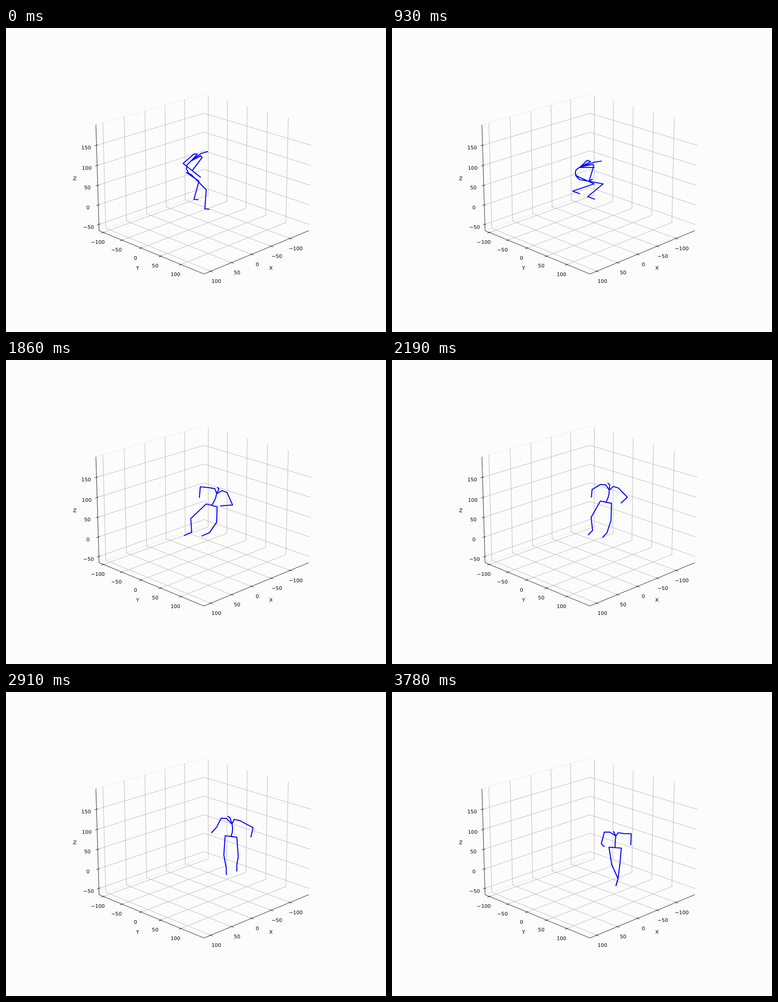
Animation of 837 by 669 pixels, one loop 3810 ms. Source, as an HTML page:

```html
<!DOCTYPE html>
<html lang="en">
<head>
<meta charset="utf-8">
<title>3D skeleton plot</title>
<style>
  html, body { margin: 0; width: 100%; height: 100%; overflow: hidden; background: #fcfcfc; }
  svg { display: block; }
  path { fill: none; stroke-width: 0.9; }
  #grid { stroke: #b0b0b0; }
  #pane { stroke: #e6e6e6; }
  #axes { stroke: #000; }
  #body { stroke: #00f; stroke-width: 2.2; stroke-linejoin: round; stroke-linecap: square; }
  text { font: 11.11px "DejaVu Sans", sans-serif; text-anchor: middle; fill: #000; }
</style>
</head>
<body>
<svg width="837" height="669" viewBox="0 0 837 669">
  <path id="pane"/>
  <path id="grid"/>
  <path id="axes"/>
  <g id="labels"></g>
  <path id="body"/>
</svg>
<script>
const LOOP = 3810, STEP = 30;
const $ = id => document.getElementById(id);
const line = (...points) => 'M' + points.map(p => p.map(n => n.toFixed(2))).join('L');
const add = (a, b, k = 1) => [a[0] + k * b[0], a[1] + k * b[1]];
const sub = (a, b) => add(a, b, -1);

// Perspective view of the unit box; (0, 0, 0) is the far floor corner
function project(x, y, z) {
  const depth = 1 - 0.07 * (x + y) - 0.0274 * z;
  return [436 + 214.8 * (y - x) / depth, (364 + 50.8 * (x + y) - 222.6 * z) / depth];
}
const edge = (...corners) => line(...corners.map(c => project(...c)));

function drawPlot() {
  const out = 1.017, inn = 0.989;
  let grid = '', labels = '';
  let axes = edge([1, 0, 1], [1, 0, 0], [1, 1, 0], [0, 1, 0]);
  const label = ([x, y], s) =>
    labels += `<text x="${x}" y="${y + 4}">${String(s).replace('-', '\u2212')}</text>`;

  for (let n = -100; n <= 150; n += 50) {
    const x = 0.565 + n * 0.00375, y = 0.4185 + n * 0.00375, z = 0.248 + n * 0.00375;
    if (n < 150) {
      grid += edge([x, 0, 1], [x, 0, 0], [x, 1, 0]) + edge([0, y, 1], [0, y, 0], [1, y, 0]);
      axes += edge([x, inn, 0], [x, out, 0]) + edge([inn, y, 0], [out, y, 0]);
      label(add(project(x, 1, 0), [12.5, 21.7]), n);
      label(add(project(1, y, 0), [-12, 21.4]), n);
    }
    if (n > -100) {
      grid += edge([1, 0, z], [0, 0, z], [0, 1, z]);
      axes += edge([inn, 0, z], [out, 0, z]);
      label(add(project(1, 0, z), [-22.8, 5.2]), n);
    }
  }
  label([583.5, 527.5], 'X');
  label([290, 527.5], 'Y');
  label([151.5, 331], 'Z');

  $('pane').setAttribute('d', edge([1, 0, 1], [0, 0, 1]) + edge([0, 0, 0], [1, 0, 0]));
  $('grid').setAttribute('d', grid);
  $('axes').setAttribute('d', axes);
  $('labels').innerHTML = labels;
}

// core: root, chest, neck, head; span: root to right hip; foot: ankle to toe
// legs: knee, ankle; arms: elbow, wrist
const crouch = {
  core: [403, 320.5, 407, 293, 430, 276, 444, 272], span: [5.5, 2.5], foot: [9, 1],
  legR: [441, 356, 438, 398], legL: [425, 337, 414, 377],
  armR: [410, 314, 424, 325], armL: [390, 298, 428, 328]
};
const tuck = {
  core: [408.5, 329, 414, 306, 447, 295, 461, 293], span: [4.2, 4.5], foot: [15, 5.5],
  legR: [465, 343, 431, 371], legL: [445, 343, 398, 359],
  armR: [434, 337, 441, 333], armL: [413, 307, 445, 307]
};
const kick = {
  core: [428.5, 330, 463, 323, 474, 310, 469, 303], span: [1, -7.6], foot: [-16.5, -8],
  legR: [398, 291, 367, 323], legL: [379, 340, 338, 365],
  armR: [451, 308, 440, 299], armL: [431, 343, 428, 319]
};
const land = {
  core: [453, 320, 464, 294, 469, 283, 466, 281], span: [-12, -3.2], foot: [-16, 7],
  legR: [407, 349, 409, 379], legL: [464, 357, 448, 380],
  armR: [428, 279, 426, 302], armL: [499, 319, 473, 321]
};
const leap = {
  core: [490.5, 307, 494, 280, 490, 266, 486, 263], span: [-12.7, -1.7], foot: [-1.5, 13],
  legR: [473, 346, 478, 372], legL: [502, 351, 501, 383],
  armR: [454, 294, 453, 303], armL: [539, 285, 540, 309]
};
const drop = {
  core: [500.5, 334, 501, 306, 495, 292, 491, 291], span: [-13.2, -1.5], foot: [1.5, 14],
  legR: [488, 377, 495, 411], legL: [522, 378, 516, 378],
  armR: [476, 304, 453, 320], armL: [548, 317, 536, 332]
};
const rest = {
  core: [491.5, 342.5, 493, 317, 488, 307, 489, 310], span: [-13.6, -1], foot: [-4.5, 15],
  legR: [484, 380, 498, 411], legL: [502, 378, 498, 410],
  armR: [461, 334, 467, 340], armL: [527, 312, 526, 336]
};

const key = (time, pose, shift = [0, 0]) => ({ time, shift, ...pose });
const keys = [
  key(0, crouch), key(550, crouch, [-1, -10]), key(930, tuck), key(1440, kick),
  key(1650, land, [-7, 9]), key(1860, land), key(2550, leap), key(2690, leap, [1, 1]),
  key(3270, drop), key(3780, rest)
];

// Smooth curve through one part of every key, returned as points
function sample(part, t) {
  const last = keys.length - 1;
  let k = 0;
  while (k < last - 1 && t >= keys[k + 1].time) k++;
  const span = keys[k + 1].time - keys[k].time;
  const u = Math.min(1, (t - keys[k].time) / span), v = 1 - u;
  const values = keys[0][part].map((_, c) => {
    const at = i => keys[i][part][c];
    const slope = i => {
      const a = Math.max(0, i - 1), b = Math.min(last, i + 1);
      return (at(b) - at(a)) / (keys[b].time - keys[a].time) * span;
    };
    return v * v * (1 + 2 * u) * at(k) + u * u * (3 - 2 * u) * at(k + 1)
      + u * v * v * slope(k) - u * u * v * slope(k + 1);
  });
  return values.flatMap((n, i) => i % 2 ? [] : [[n, values[i + 1]]]);
}

function drawBody(t) {
  const [root, chest, neck, head] = sample('core', t);
  const [span] = sample('span', t), [foot] = sample('foot', t), [shift] = sample('shift', t);
  const throat = sub(neck, chest);

  // The back arches away from where the head points
  const back = sub(chest, root);
  const bend = 0.5 * (head[0] - neck[0]) / Math.hypot(...back);
  const vertebra = f => add(add(root, back, f), [back[1], -back[0]], bend);

  const leg = (side, part) => {
    const [knee, ankle] = sample(part, t);
    return line(root, add(root, span, side), knee, ankle, add(ankle, foot));
  };
  const arm = (side, part) => {
    const shoulder = add(add(chest, throat, 0.7), span, 1.6 * side);
    const collar = add(add(chest, sub(shoulder, chest), 0.42), throat, 0.5);
    return line(chest, collar, shoulder, ...sample(part, t));
  };
  $('body').setAttribute('d', line(root, vertebra(1 / 3), vertebra(2 / 3), chest, neck, head)
    + leg(1, 'legR') + leg(-1, 'legL') + arm(1, 'armR') + arm(-1, 'armL'));
  $('body').setAttribute('transform', `translate(${shift})`);
}

drawPlot();
drawBody(0);
const start = performance.now();
function tick() {
  const t = (performance.now() - start) % LOOP;
  drawBody(Math.floor(t / STEP) * STEP);
  requestAnimationFrame(tick);
}
requestAnimationFrame(tick);
</script>
</body>
</html>
```
